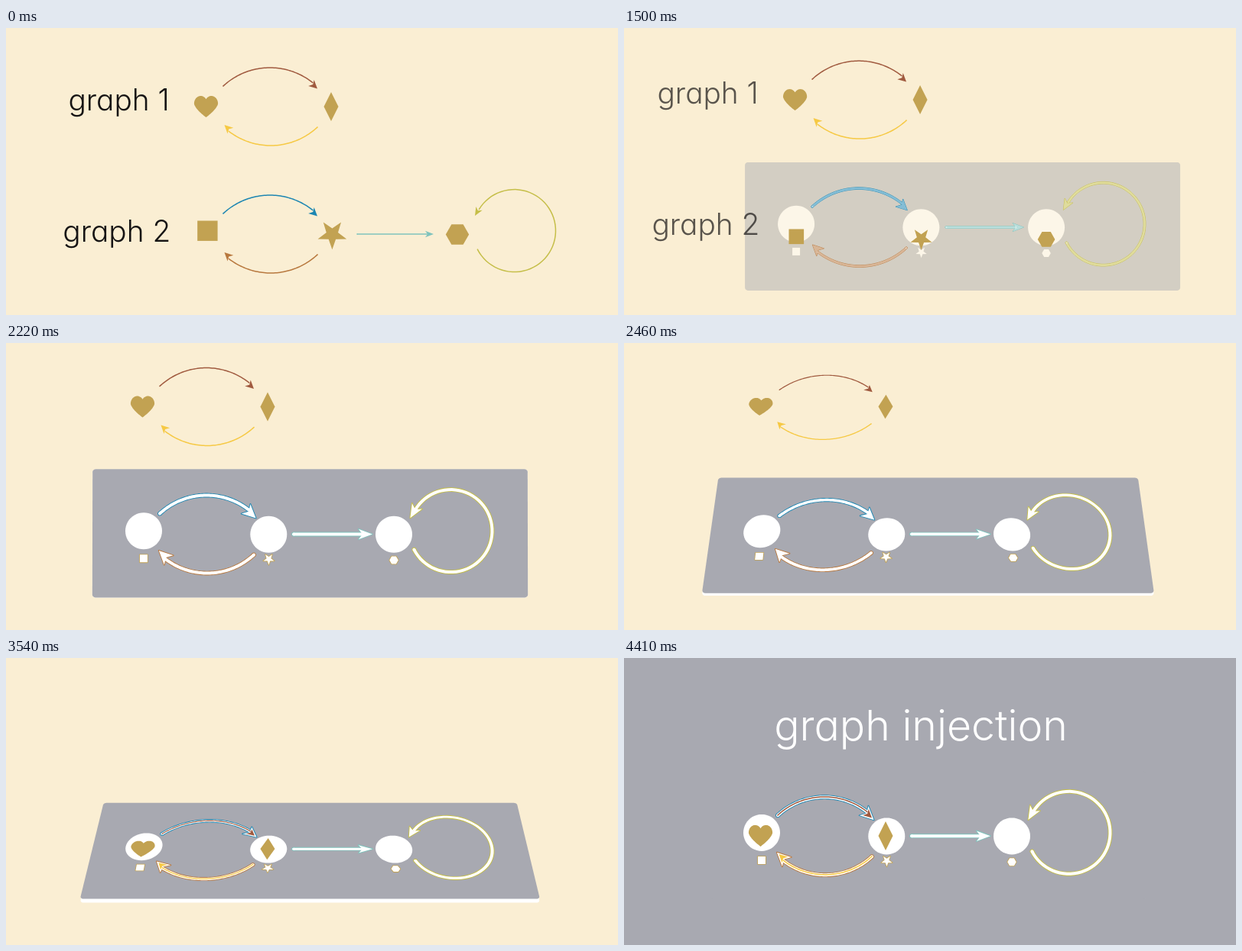
An HTML page with a canvas that plays this animation: 800 px wide and 376 px high, repeating every 5.67 s.

```html
<!DOCTYPE html>
<html lang="en">
<head>
<meta charset="utf-8">
<title>graph injection</title>
<style>
html, body { margin: 0; width: 100%; height: 100%; overflow: hidden; background: #faeed3; }
canvas, svg { position: absolute; left: 0; top: 0; width: 800px; height: 376px; }
text {
  font-family: Inter, Lato, sans-serif;
  font-weight: 300;
  font-feature-settings: "cv11";
  text-anchor: middle;
}
.label { font-size: 38.8px; fill: #161414; }
.title { font-size: 55.4px; fill: #fff; }
</style>
</head>
<body>
<canvas id="stage" width="800" height="376"></canvas>
<svg viewBox="0 0 800 376">
  <g id="labels" class="label">
    <text x="147.6" y="108">graph 1</text>
    <text x="144.8" y="280">graph 2</text>
  </g>
  <text id="title" class="title" x="388" y="108">graph injection</text>
</svg>
<script>
const LOOP = 5670, STEP = 30, DEPTH = 1110, EYE = { x: 400, y: 188 };
const CREAM = [250, 238, 211], GRAY = [168, 169, 177], WHITE = [255, 255, 255];
const GOLD = '#c2a252';

const ctx = document.getElementById('stage').getContext('2d');
const labels = document.getElementById('labels');
const title = document.getElementById('title');

const lerp = (a, b, p) => a + (b - a) * p;
const span = (t, from, to) => Math.min(1, Math.max(0, (t - from) / (to - from)));
const ease = p => 0.5 - 0.5 * Math.cos(Math.PI * p);
const mix = (a, b, p) => `rgb(${a.map((v, i) => Math.round(lerp(v, b[i], p))).join()})`;
const rad = deg => deg * Math.PI / 180;

// Point lists in flat coordinates
const round = (n, fn) => Array.from({ length: n }, (_, i) => fn(i / n * 2 * Math.PI));
const disc = (x, y, r) => round(48, a => [x + r * Math.cos(a), y + r * Math.sin(a)]);
const unit = {
  heart: round(96, a => {
    const u = Math.abs(Math.sin(a));
    const lobe = -10 * Math.sqrt(Math.max(0, 1 - ((u - 0.45) / 0.55) ** 2));
    return [15.6 * Math.sin(a), Math.cos(a) > 0 ? lobe : 18 * (1 - u) ** 0.65];
  }),
  diamond: [[0, -19], [9.5, 0], [0, 19], [-9.5, 0]],
  square: [[-13.2, -13.2], [13.2, -13.2], [13.2, 13.2], [-13.2, 13.2]],
  star: Array.from({ length: 10 }, (_, i) => {
    const r = i % 2 ? 8 : 19.8, a = rad(i * 36 + 90);
    return [r * Math.cos(a), r * Math.sin(a)];
  }),
  hexagon: round(6, a => [15.2 * Math.cos(a), 15.2 * Math.sin(a)])
};
const shape = (name, x, y, k = 1) => unit[name].map(([u, v]) => [x + u * k, y + v * k]);

function roundRect(cx, cy, hw, hh, r) {
  const pts = [];
  for (let q = 0; q < 4; q++) {
    const sx = q === 0 || q === 3 ? 1 : -1, sy = q < 2 ? 1 : -1;
    for (let i = 0; i <= 6; i++) {
      const a = (q + i / 6) * Math.PI / 2;
      pts.push([cx + sx * (hw - r) + r * Math.cos(a), cy + sy * (hh - r) + r * Math.sin(a)]);
    }
  }
  return pts;
}

function arcBand(cx, cy, r, from, to, w) {
  const n = 60, outer = [], inner = [];
  for (let i = 0; i <= n; i++) {
    const a = rad(lerp(from, to, i / n)), c = Math.cos(a), s = Math.sin(a);
    outer.push([cx + (r + w / 2) * c, cy + (r + w / 2) * s]);
    inner.unshift([cx + (r - w / 2) * c, cy + (r - w / 2) * s]);
  }
  return outer.concat(inner);
}

function head(x, y, dir, size, k) {
  const c = Math.cos(rad(dir)), s = Math.sin(rad(dir));
  const push = lerp(0, 3.2, size) * k, len = lerp(11, 18, size), hw = lerp(4.8, 7.5, size) * k;
  return [[0, 0], [-len, hw], [-len * 0.72, 0], [-len, -hw]]
    .map(([u, v]) => [x + (u + push) * c - v * s, y + (u + push) * s + v * c]);
}

// Curved arrows: centre, radius, start and end angle; tip and its direction
const over = (dy, color) => ({
  color, k: 1.15, arc: [345, 308.5 + dy, 89.5, -133, -51], tip: [407, 246.5 + dy, 43]
});
const under = (dy, color) => ({
  color, k: 1.15, arc: [346, 231.5 + dy, 89.5, 47, 128], tip: [285.5, 294 + dy, 224]
});
const arrows1 = [over(-167, '#a05a3f'), under(-167, '#f6c944')];
const arrows2 = [
  over(0, '#1c86b2'),
  under(0, '#b8783e'),
  { color: '#7fc3bd', k: 0.9, line: [459, 270, 551], tip: [559, 270, 0] },
  { color: '#c5be48', k: 1, arc: [664.5, 265.6, 54, 153, -149], tip: [613, 246, 120] }
];
const nodes = [
  { name: 'square', at: [263.4, 265.7], disc: [263, 265.7], icon: [263, 301.8] },
  { name: 'star', at: [426.4, 270.4], disc: [426.3, 270.2], icon: [426.5, 302.6] },
  { name: 'hexagon', at: [590, 270.5], disc: [590, 270.2], icon: [590, 304] }
];
const panel = roundRect(480.5, 268.8, 284.5, 84, 4);

// Tilt a plane around its horizontal axis and project it
function plane(pivot, dx, dy, tilt) {
  const c = Math.cos(tilt), s = Math.sin(tilt);
  return ([x, y]) => {
    const v = y - pivot, k = DEPTH / (DEPTH - v * s);
    return [EYE.x + (x + dx - EYE.x) * k, EYE.y + (pivot + dy - EYE.y + v * c) * k];
  };
}

function trace(proj, pts) {
  ctx.beginPath();
  pts.forEach(p => ctx.lineTo(...proj(p)));
  ctx.closePath();
}

function fill(proj, pts, color, edge = 0, edgeColor = color) {
  trace(proj, pts);
  if (edge > 0) {
    ctx.strokeStyle = edgeColor;
    ctx.lineWidth = edge;
    ctx.stroke();
  }
  ctx.fillStyle = color;
  ctx.fill();
}

function drawArrow(proj, a, size) {
  const w = lerp(1.5, 4, size);
  const parts = [head(...a.tip, size, a.k)];
  if (a.arc) {
    const [cx, cy, r, from] = a.arc, q = rad(from);
    parts.push(arcBand(...a.arc, w), disc(cx + r * Math.cos(q), cy + r * Math.sin(q), w / 2));
  } else {
    const [x, y, end] = a.line;
    parts.push([[x, y - w / 2], [end, y - w / 2], [end, y + w / 2], [x, y + w / 2]], disc(x, y, w / 2));
  }
  parts.forEach(pts => fill(proj, pts, a.color, 1.8 * size));
  if (!size) return;
  ctx.globalAlpha = size;
  parts.forEach(pts => fill(proj, pts, '#fff'));
  ctx.globalAlpha = 1;
}

function draw(t) {
  const move = ease(span(t, 1285, 1740));
  const fade = span(t, 1305, 1720);
  const drop = ease(span(t, 3090, 3540));
  const rise = span(t, 3990, 4410), flat = ease(rise);
  const tilt = rad(45) * (ease(span(t, 2190, 2640)) - flat);
  const dx = -83 * move, dy = -19.5 * move - 17.3 * rise;
  const g1 = plane(102.2, dx, dy + 166.7 * drop, tilt);
  const g2 = plane(268.9, dx, dy, tilt);
  const paper = mix(CREAM, WHITE, fade);

  ctx.lineJoin = 'round';
  ctx.fillStyle = mix(CREAM, GRAY, flat);
  ctx.fillRect(0, 0, 800, 376);

  if (fade > 0) {
    const thick = 7 * Math.sin(tilt);
    if (thick > 0.01) {
      fill(p => { const [x, y] = g2(p); return [x, y + thick]; }, panel, '#fff');
    }
    fill(g2, panel, mix(CREAM, GRAY, fade));
    for (const n of nodes) {
      fill(g2, disc(...n.disc, 24), paper);
      fill(g2, shape(n.name, ...n.icon, 0.38), paper, t >= 1890 ? 1.6 : 0, GOLD);
    }
  }
  arrows2.forEach(a => drawArrow(g2, a, move));

  // The gold shapes shrink onto their icons, then give way to them
  if (t < 1890) {
    for (const n of nodes) {
      const x = lerp(n.at[0], n.icon[0], move), y = lerp(n.at[1], n.icon[1], move);
      fill(g2, shape(n.name, x, y, lerp(1, 0.44, move)), GOLD);
    }
  }

  arrows1.forEach(a => drawArrow(g1, a, 0));
  fill(g1, shape('heart', 261.5, 99), GOLD);
  fill(g1, shape('diamond', 425, 103), GOLD);

  labels.setAttribute('transform', `translate(${dx} ${dy})`);
  labels.setAttribute('opacity', 1 - ease(span(t, 1290, 1860)));
  title.setAttribute('opacity', flat);
}

const begin = performance.now();
function tick() {
  const t = (performance.now() - begin) % LOOP;
  draw(Math.floor(t / STEP) * STEP);
  requestAnimationFrame(tick);
}
tick();
</script>
</body>
</html>
```
